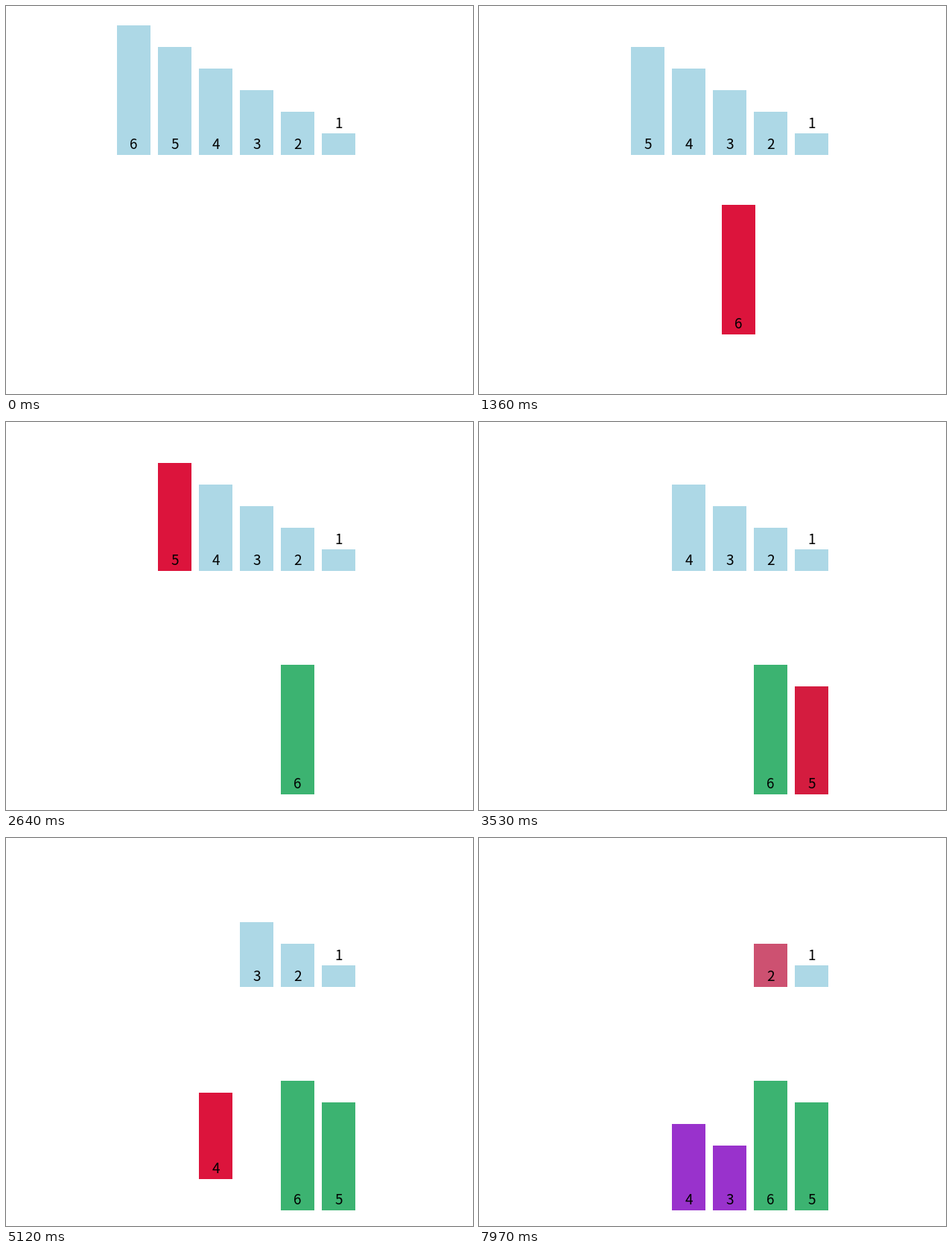
Animation, 627 px wide and 521 px high, one loop 8 s. Source, as a matplotlib script:

```python
import math

import matplotlib.pyplot as plt
from matplotlib.animation import FuncAnimation
from matplotlib.colors import to_rgb
from matplotlib.patches import Rectangle

W, H, DPI = 627, 521, 100
LOOP, INTERVAL = 8000, 20
TICK = 70          # the picture advances in steps of this many ms
DURATION = 500     # length of each transition
BAR_W, PITCH, UNIT = 45, 55, 29
TOP_BASE, DROP = 200, 300
NEVER = 10 * LOOP

IDLE, ACTIVE = to_rgb("lightblue"), to_rgb("crimson")
GREEN, PURPLE = to_rgb("mediumseagreen"), to_rgb("darkorchid")

# value: (slot it lands in, settled colour, highlight start, move start, move lead-in)
PLAN = {
    6: (4, GREEN, 330, 1150, 107),
    5: (5, GREEN, 2150, 2970, 56),
    4: (2, PURPLE, 4020, 4840, 56),
    3: (3, PURPLE, 5890, 6710, 85),
    2: (4, GREEN, 7760, NEVER, 0),
    1: (5, GREEN, NEVER, NEVER, 0),
}


def slot_x(slot):
    return 149 + PITCH * slot


def ease(ms):
    """Cubic in-out over one transition."""
    t = min(max(ms / DURATION, 0), 1)
    return 4 * t ** 3 if t < 0.5 else 1 - 4 * (1 - t) ** 3


def elapsed(now, start, lead):
    return lead + TICK * math.floor((now - start) / TICK) if now >= start else 0


def lerp(a, b, k):
    return a + (b - a) * k


def mix(a, b, k):
    return tuple(lerp(p, q, k) for p, q in zip(a, b))


class Bar:
    def __init__(self, ax, slot, value):
        self.home, self.value = slot_x(slot), value
        target, self.settled, self.lit, self.moved, self.lead = PLAN[value]
        self.target = slot_x(target)
        self.label_gap = 8 if value > 1 else 36
        self.rect = ax.add_patch(
            Rectangle((0, 0), BAR_W, UNIT * value, lw=0, zorder=2 * slot))
        self.label = ax.text(
            0, 0, str(value), ha="center", va="baseline", color="black",
            family="Noto Sans CJK JP", size=19 * 72 / DPI, zorder=2 * slot + 1)

    def update(self, now):
        travel = elapsed(now, self.moved, self.lead)
        k = ease(travel)
        x = round(lerp(self.home, self.target, k))
        base = round(TOP_BASE + DROP * k)
        colour = mix(IDLE, ACTIVE, ease(elapsed(now, self.lit, 77)))
        colour = mix(colour, self.settled, ease(travel - DURATION))
        self.rect.set_xy((x, base - UNIT * self.value))
        self.rect.set_facecolor(colour)
        self.label.set_position((x + BAR_W / 2, base - self.label_gap))


fig = plt.figure(figsize=(W / DPI, H / DPI), dpi=DPI, facecolor="white")
ax = fig.add_axes([0, 0, 1, 1])
ax.set_xlim(0, W)
ax.set_ylim(H, 0)
ax.axis("off")
bars = [Bar(ax, slot, value) for slot, value in enumerate(PLAN)]


def draw(frame):
    now = frame * INTERVAL + INTERVAL / 2
    for bar in bars:
        bar.update(now)
    return []


anim = FuncAnimation(fig, draw, frames=LOOP // INTERVAL, interval=INTERVAL,
                     repeat=True, repeat_delay=0, blit=False)
plt.show()
```
